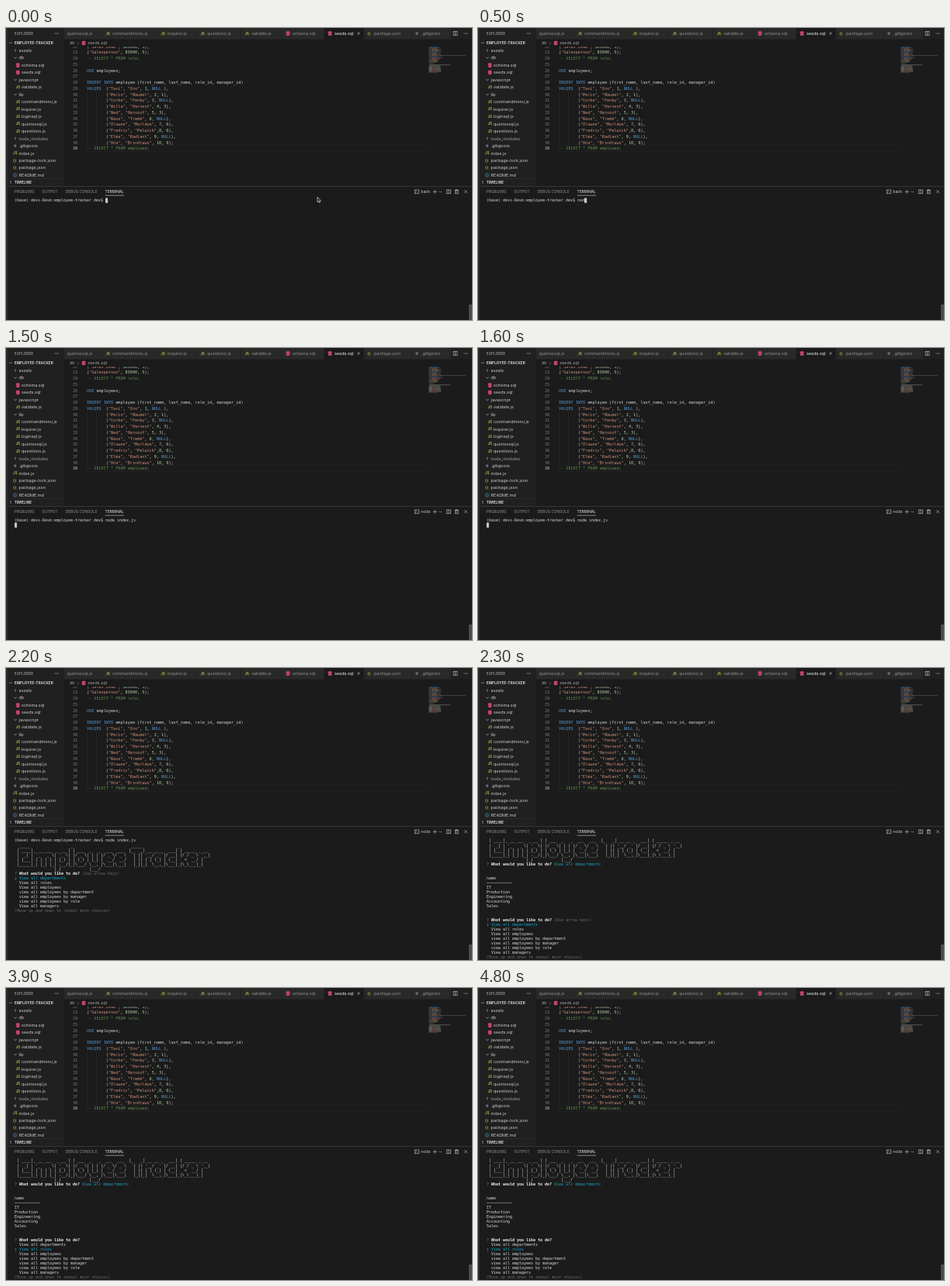
An HTML page with a canvas for the animation above (5 s loop, 600 px wide and 377 px high).

```html
<!DOCTYPE html>
<html lang="en">
<head>
<meta charset="utf-8">
<title>Employee Tracker</title>
<style>
html, body { margin: 0; width: 100%; height: 100%; overflow: hidden; background: #1b1b1b; }
canvas { display: block; width: 600px; height: 377px; }
</style>
</head>
<body>
<canvas id="stage"></canvas>
<script>
const W = 600, H = 377, LOOP = 5000;
const UI = 'Inter, "Open Sans", sans-serif';
const MONO = '"DejaVu Sans Mono", "Liberation Mono", monospace';
const UI_SIZE = 5.45, CAPS_SIZE = 4.75, CODE_SIZE = 5.15, TERM_SIZE = 4.98;
const CODE_COL = 3.1, CODE_LINE = 7.75, TERM_COL = 3, TERM_LINE = 6.03, TERM_ROWS = 26;
const C = {
  editor: '#1b1b1b', side: '#202021', tab: '#292929', line: '#343434',
  text: '#cccccc', dim: '#8c8c8c', faint: '#6b6b6b', white: '#f2f2f2',
  yellow: '#cbcb41', pink: '#ee4b80', blue: '#519aba', cyan: '#11a8cd', green: '#23b575',
  keyword: '#569cd6', string: '#ce9178', number: '#b5cea8', comment: '#5f9149'
};

const dpr = window.devicePixelRatio || 1;
const makeCanvas = el => {
  el.width = W * dpr;
  el.height = H * dpr;
  const g = el.getContext('2d');
  g.scale(dpr, dpr);
  return g;
};
const stage = makeCanvas(document.getElementById('stage'));
const backdrop = document.createElement('canvas');
let ctx = makeCanvas(backdrop);

function rect(x, y, w, h, color) {
  ctx.fillStyle = color;
  ctx.fillRect(x, y, w, h);
}

// Laid out at ten times the size so that advances stay fractional.
function text(str, x, y, color, size = UI_SIZE, font = UI, weight = 400) {
  ctx.save();
  ctx.translate(x, y + size * 0.36);
  ctx.scale(0.1, 0.1);
  ctx.font = `${weight} ${size * 10}px ${font}`;
  ctx.fillStyle = color;
  ctx.fillText(str, 0, 0);
  ctx.restore();
}

function path(points, color, width = 0.6, fill) {
  ctx.beginPath();
  points.forEach(([x, y], i) => i ? ctx.lineTo(x, y) : ctx.moveTo(x, y));
  if (fill) {
    ctx.closePath();
    ctx.fillStyle = fill;
    ctx.fill();
  }
  ctx.strokeStyle = color;
  ctx.lineWidth = width;
  ctx.stroke();
}

function box(x, y, w, h, color, width = 0.6) {
  ctx.strokeStyle = color;
  ctx.lineWidth = width;
  ctx.strokeRect(x, y, w, h);
}

function dot(x, y, r, color) {
  ctx.fillStyle = color;
  ctx.beginPath();
  ctx.arc(x, y, r, 0, Math.PI * 2);
  ctx.fill();
}

function chevron(x, y, open, color = C.text) {
  const r = 1.7, h = 0.9;
  path(open ? [[x - r, y - h], [x, y + h], [x + r, y - h]]
            : [[x - h, y - r], [x + h, y], [x - h, y + r]], color);
}

const cross = (x, y, r, color) => {
  path([[x - r, y - r], [x + r, y + r]], color);
  path([[x + r, y - r], [x - r, y + r]], color);
};

const dots = (x, y, color) => [-2, 0, 2].forEach(d => dot(x + d, y, 0.55, color));

const splitIcon = (x, y, color) => {
  box(x - 2.4, y - 2.4, 4.8, 4.8, color);
  path([[x, y - 2.4], [x, y + 2.4]], color);
};

// File icon centred on x, y, chosen by the file's extension.
function fileIcon(name, x, y) {
  const ext = name.split('.').pop();
  if (ext === 'js') text('JS', x - 2.6, y, C.yellow, 4.4, UI, 600);
  else if (ext === 'json') text('{}', x - 2.7, y - 0.1, C.yellow, 4.8, UI, 600);
  else if (ext === 'sql') {
    ctx.fillStyle = C.pink;
    ctx.beginPath();
    ctx.ellipse(x, y - 1.8, 2.3, 0.9, 0, Math.PI, 0);
    ctx.lineTo(x + 2.3, y + 1.8);
    ctx.ellipse(x, y + 1.8, 2.3, 0.9, 0, 0, Math.PI);
    ctx.fill();
    [-0.9, 0.9].forEach(d => rect(x - 2.3, y + d - 0.2, 4.6, 0.4, C.side));
  } else if (ext === 'md') {
    ctx.beginPath();
    ctx.arc(x, y, 2.2, 0, Math.PI * 2);
    ctx.strokeStyle = C.blue;
    ctx.lineWidth = 0.6;
    ctx.stroke();
    rect(x - 0.3, y - 0.3, 0.6, 1.6, C.blue);
    dot(x, y - 1.1, 0.4, C.blue);
  } else dot(x, y, 1.9, '#5c6b73');
}

function drawSidebar() {
  rect(0, 0, 75, 204, C.side);
  text('EXPLORER', 10.8, 7, '#b5b5b5', CAPS_SIZE);
  dots(65.5, 7, C.text);
  chevron(6, 19.2, true);
  text('EMPLOYEE-TRACKER', 10.8, 19.3, C.text, CAPS_SIZE, UI, 700);
  // ">" closed folder, "v" open folder, "-" nested file
  const tree = ['>assets', 'vdb', '-schema.sql', '-seeds.sql', 'vjavascript', '-validate.js', 'vlib',
    '-commandmenu.js', '-inquirer.js', '-loginsql.js', '-queriessql.js', '-questions.js',
    '>node_modules', ' .gitignore', ' index.js', ' package-lock.json', ' package.json', ' README.md'];
  tree.forEach((entry, i) => {
    const kind = entry[0], name = entry.slice(1), y = 29 + i * 9.47;
    const folder = kind === '>' || kind === 'v', nested = kind === '-';
    if (folder) chevron(12, y, kind === 'v');
    else fileIcon(name, nested ? 15.3 : 11.7, y);
    text(name, nested ? 20 : 16.6, y, name === 'node_modules' ? '#a5a5a5' : C.text);
  });
  rect(2, 194.3, 73, 0.5, C.line);
  chevron(6, 199, false);
  text('TIMELINE', 10.8, 199, C.text, CAPS_SIZE, UI, 700);
}

function drawTabs() {
  rect(75, 0, 525, 14.5, C.side);
  const tabs = [['queriessql.js', 75], ['commandmenu.js', 124], ['inquirer.js', 195], ['questions.js', 246],
    ['validate.js', 303], ['schema.sql', 356], ['seeds.sql', 410], ['package.json', 461], ['.gitignore', 522]];
  tabs.forEach(([name, x], i) => {
    const end = i < 8 ? tabs[i + 1][1] : 573, active = name === 'seeds.sql';
    rect(x, 0, end - x - 0.5, 14.5, active ? C.editor : C.tab);
    if (i) fileIcon(name, x + 7, 7);
    text(name, x + (i ? 12.9 : 3.5), 7, active ? C.white : '#939393');
  });
  cross(454, 7, 1.6, C.text);
  splitIcon(578.5, 7, C.text);
  dots(592, 7, C.text);
}

const code = [
  '("Sales Lead", 105000, 5),',
  '("Salesperson", 85000, 5);',
  '-- SELECT * FROM role;',
  '',
  'USE employees;',
  '',
  'INSERT INTO employee (first_name, last_name, role_id, manager_id)',
  'VALUES  ("Tavi", "Oro", 1, NULL ),',
  '        ("Perin", "Maudel", 2, 1),',
  '        ("Corbo", "Fenby", 3, NULL),',
  '        ("Willa", "Harvost", 4, 3),',
  '        ("Ned", "Harvost", 5, 3),',
  '        ("Ravo", "Tremb", 6, NULL),',
  '        ("Oluwen", "Marldon", 7, 6),',
  '        ("Fredric", "Pelwick",8, 6),',
  '        ("Elma", "Radiant", 9, NULL),',
  '        ("Una", "Brindlaws", 10, 9);',
  '-- SELECT * FROM employee;'
];
const TOKEN = /(--.*|"[^"]*"|\b(?:USE|INSERT INTO|VALUES|NULL)\b|\b\d+\b)/;
const tokenColor = s => s.startsWith('--') ? C.comment : s[0] === '"' ? C.string
  : /^\d/.test(s) ? C.number : TOKEN.test(s) ? C.keyword : '#d4d4d4';

function eachToken(line, draw) {
  let col = 0;
  for (const part of line.split(TOKEN)) {
    if (part.trim()) draw(part, col, tokenColor(part));
    col += part.length;
  }
}

function drawEditor() {
  rect(75, 14.5, 525, 190, C.editor);
  box(104, 151.8, 439, 7.6, '#272727', 0.5);
  code.forEach((line, i) => {
    const y = 23.8 + i * CODE_LINE, last = i === code.length - 1;
    text(String(22 + i), 86, y, last ? '#c6c6c6' : '#7d7d7d', CODE_SIZE, MONO);
    if (line.startsWith('  ')) [104, 116.4].forEach(x => rect(x, y - 3.9, 0.4, CODE_LINE, '#363636'));
    eachToken(line, (s, col, color) => text(s, 104 + col * CODE_COL, y, color, CODE_SIZE, MONO));
  });

  rect(75, 14.5, 468, 9.6, C.editor);
  text('db', 82, 19.4, '#9d9d9d');
  chevron(93, 19.4, false, '#8a8a8a');
  fileIcon('seeds.sql', 100, 19.4);
  text('seeds.sql', 105.3, 19.4, '#a8a8a8');
}

function drawMinimap() {
  ctx.globalAlpha = 0.6;
  for (let i = 0; i < 21; i++) {
    const y = 24.3 + i * 0.86, entry = i % 7 > 1;
    rect(544.5, y, entry ? 3 : 12 + i % 3 * 2, 0.5, entry ? '#777' : C.keyword);
    if (entry) rect(548, y, 6 + i * 5 % 9, 0.5, C.string);
    if (i === 13) rect(558, y, 34, 0.5, '#999');
  }
  code.forEach((line, i) => eachToken(line, (s, col, color) =>
    rect(544.5 + col * 0.43, 42.4 + i * 0.86, s.length * 0.43, 0.5, color)));
  ctx.globalAlpha = 1;
}

function drawPanel() {
  rect(0, 204, W, H - 204, C.editor);
  rect(2, 204, W - 2, 0.8, '#3d3d3d');
  [['PROBLEMS', 10.8], ['OUTPUT', 46.8], ['DEBUG CONSOLE', 76.8], ['TERMINAL', 127.6]].forEach(([s, x]) =>
    text(s, x, 211.5, s === 'TERMINAL' ? C.white : '#969696', CAPS_SIZE));
  rect(127.6, 215.8, 24.4, 0.6, '#d0d0d0');

  const y = 211.4;
  box(526.6, y - 2.4, 5, 4.8, C.text);
  path([[527.7, y - 1.2], [528.9, y], [527.7, y + 1.2]], C.text, 0.5);
  path([[549.6, y], [554.8, y]], C.text);
  path([[552.2, y - 2.6], [552.2, y + 2.6]], C.text);
  chevron(559.3, y, true, '#a5a5a5');
  splitIcon(570, y, C.text);
  path([[577.8, y - 1.8], [582.8, y - 1.8]], C.text);
  path([[579.4, y - 1.8], [579.4, y - 2.7], [581.2, y - 2.7], [581.2, y - 1.8]], C.text, 0.5);
  box(578.5, y - 1.6, 3.6, 4.1, C.text);
  path([[580.3, y - 0.6], [580.3, y + 1.6]], C.text, 0.5);
  cross(592, y, 1.9, C.text);
  rect(596, 357, 4, 20, '#4d4d4d');
  rect(0, 0, 2, H, '#2c2c2c');
}

const banner = [
  "  _____                 _                         _____               _",
  " | ____|_ __ ___  _ __ | | ___  _   _  ___  ___  |_   _| __ __ _  ___| | _____ _ __",
  " |  _| | '_ ` _ \\| '_ \\| |/ _ \\| | | |/ _ \\/ _ \\   | || '__/ _` |/ __| |/ / _ \\ '__|",
  " | |___| | | | | | |_) | | (_) | |_| |  __/  __/   | || | | (_| | (__|   <  __/ |",
  " |_____|_| |_| |_| .__/|_|\\___/ \\__, |\\___|\\___|   |_||_|  \\__,_|\\___|_|\\_\\___|_|",
  "                 |_|            |___/"
];
const choices = ['View all departments', 'View all roles', 'View all employees',
  'view all employees by department', 'view all employees by manager', 'view all employees by role',
  'View all managers'];
const table = ['', '', 'name', '─'.repeat(11), 'IT', 'Production', 'Engineering', 'Accounting', 'Sales', '', ''];

const SHELL = '(base) devs-Desk:employee-tracker dev$ ';
const COMMAND = 'node index.js';
const keyTimes = [300, 400, 500, 600, 700, 1000, 1050, 1100, 1130, 1150, 1170, 1190, 1200];
const ENTER = 1400, MENU = 1700, CHOOSE = 2300, ARROW = 3900;

// A row is a list of runs: [column, text, colour, weight].
const plain = s => [[0, s, '#dcdcdc']];
const question = (after, color) =>
  [[0, '?', C.green], [2, 'What would you like to do?', C.white, 700], [29, after, color]];
const menu = (picked, hint) => [
  question(hint, C.faint),
  ...choices.map((s, i) => i === picked ? [[0, '❯', C.cyan], [2, s, C.cyan]] : [[2, s, '#dcdcdc']]),
  [[0, '(Move up and down to reveal more choices)', C.faint]]
];

function terminalRows(t) {
  const rows = [plain(SHELL + COMMAND.slice(0, keyTimes.filter(k => t >= k).length))];
  if (t >= MENU) rows.push(...banner.map(plain));
  if (t >= CHOOSE) rows.push(question(choices[0], C.cyan), ...table.map(plain));
  if (t >= MENU) rows.push(...(t < ARROW ? menu(0, '(Use arrow keys)') : menu(1, '')));
  return rows;
}

function drawTerminal(t) {
  text(t < ENTER ? 'bash' : 'node', 534.3, 211.5, C.text, 5.1);
  const rows = terminalRows(t);
  rows.slice(-TERM_ROWS).forEach((runs, i) => runs.forEach(([col, s, color, weight]) =>
    text(s, 11 + col * TERM_COL, 222.7 + i * TERM_LINE, color, TERM_SIZE, MONO, weight)));
  if (t < MENU) {
    const col = t < ENTER ? rows[0][0][1].length : 0;
    rect(11 + col * TERM_COL, 219.5 + (t < ENTER ? 0 : TERM_LINE), 3.1, 6.3, '#c8c8c8');
  }
}

// Position along [time, x, y] stops with a smooth ease between them.
function along(stops, t) {
  const i = stops.findIndex(s => s[0] > t);
  if (i < 0) return stops[stops.length - 1].slice(1);
  if (i === 0) return stops[0].slice(1);
  const [a, b] = [stops[i - 1], stops[i]];
  const u = (t - a[0]) / (b[0] - a[0]), e = u * u * (3 - 2 * u);
  return [a[1] + (b[1] - a[1]) * e, a[2] + (b[2] - a[2]) * e];
}

function drawPointer(t) {
  if (t < 300) {
    const [x, y] = along([[0, 401, 218.3], [100, 401, 218.3], [300, 402, 224.5]], t);
    const shape = [[0, 0], [0, 6.4], [1.4, 5.1], [2.4, 7.3], [3.4, 6.8], [2.5, 4.8], [4.3, 4.7], [0, 0]];
    path(shape.map(([dx, dy]) => [x + dx, y + dy]), '#e8e8e8', 0.7, '#111');
  } else if (t >= 2600 && t < ARROW) {
    const [x, y] = along([[2600, 25, 328], [3000, 32, 302.3]], t);
    path([[x, y - 3.6], [x, y + 3.6]], '#e4e4e4', 0.8);
    [-1, 1].forEach(d =>
      path([[x - 1.7, y + d * 4.1], [x, y + d * 3.4], [x + 1.7, y + d * 4.1]], '#e4e4e4', 0.7));
  }
}

rect(0, 0, W, H, C.editor);
drawSidebar();
drawEditor();
drawMinimap();
drawTabs();
drawPanel();
ctx = stage;

const start = performance.now();
function frame() {
  const elapsed = (performance.now() - start) % LOOP;
  const t = Math.floor(elapsed / 100) * 100;
  ctx.drawImage(backdrop, 0, 0, W, H);
  drawTerminal(t);
  drawPointer(t);
  requestAnimationFrame(frame);
}
frame();
</script>
</body>
</html>
```
